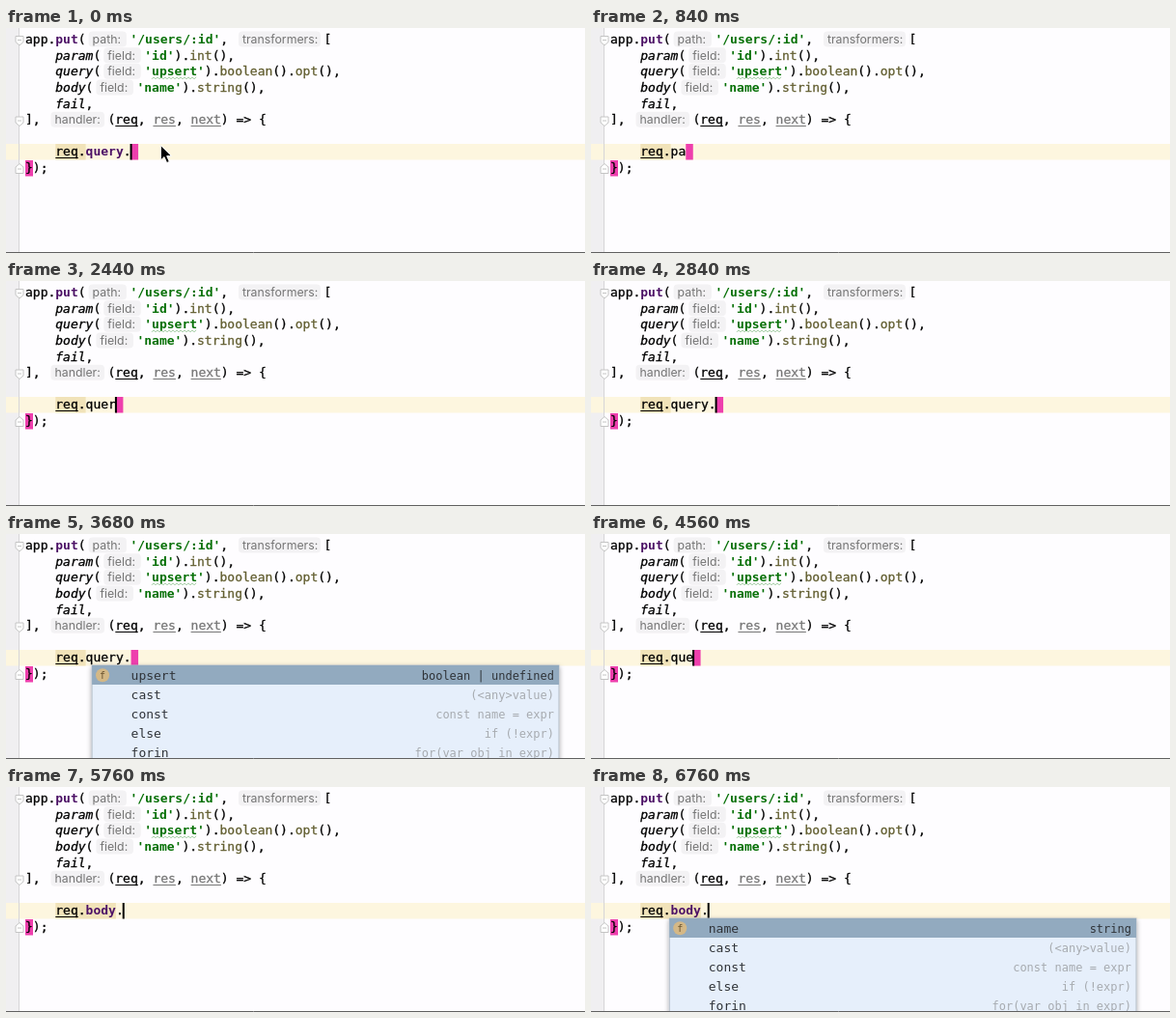
Recreate the animation shown at these times as an HTML page. Size 600 px wide and 233 px high, loop 6800 ms.

```html
<!DOCTYPE html>
<html lang="en">
<head>
<meta charset="utf-8">
<title>Typed request completion</title>
<style>
html, body { margin: 0; height: 100%; overflow: hidden; background: #fefdff; }
svg { display: block; width: 600px; height: 233px; }
text { font: 13px "DejaVu Sans Mono", monospace; white-space: pre; fill: #000; stroke: #000; stroke-width: .3px; }
.hint { font: 12.3px Inter, Roboto, sans-serif; fill: #757575; stroke: none; }
.it { font-style: italic; }
.str { font-weight: bold; fill: #067006; stroke: none; }
.prop { font-weight: bold; fill: #4c1166; stroke: none; }
.fn { fill: #625e30; stroke: #625e30; }
.dim { fill: #777; stroke: #777; }
.type { font-size: 12px; text-anchor: end; fill: #a7abb0; stroke: none; }
.sel { fill: #2f3338; stroke: none; }
.icon { font-size: 10px; text-anchor: middle; fill: #6b5430; stroke: none; }
</style>
</head>
<body>
<svg viewBox="0 0 600 233">
  <defs>
    <filter id="shadow" x="-5%" y="-10%" width="110%" height="125%">
      <feDropShadow dx="0" dy="2" stdDeviation="2.5" flood-opacity=".35"/>
    </filter>
  </defs>
  <rect width="600" height="233" fill="#fefdff"/>
  <rect width="13.5" height="233" fill="#f0eff1"/>
  <rect y="120" width="600" height="16.5" fill="#fdf6df"/>
  <path d="M13.5 0V233" stroke="#d6d5d7"/>
  <g id="code"></g>
  <g id="live"></g>
  <path d="M0 232.5H600" stroke="#606060"/>
</svg>
<script>
const LOOP = 6800, CHAR = 7.826, LEFT = 20, INDENT = LEFT + 4 * CHAR;
const PINK = '#ee3fad';
const baseline = row => 16.1 + 16.62 * row;
const esc = s => s.replace(/&/g, '&amp;').replace(/</g, '&lt;');
const text = (x, y, s, cls = '') => `<text x="${x}" y="${y}" class="${cls}">${esc(s)}</text>`;
const rect = (x, y, w, h, fill, more = '') =>
  `<rect x="${x}" y="${y}" width="${w}" height="${h}" fill="${fill}" ${more}/>`;
const underline = (x, y, chars, color) => rect(x, Math.round(y + 2), chars * CHAR, 1, color);

// Lays out [text, class] parts; a "hint" part is a pill of the given width.
function line(row, x, parts) {
  const y = baseline(row);
  let out = '';
  for (const [s, cls = '', width] of parts) {
    if (cls === 'hint') {
      out += rect(x + 3, y - 12.5, width, 16, '#f3f2f4', 'rx="4"') + text(x + 7, y - .2, s, cls);
      x += width + 6.5;
      continue;
    }
    const [style, mark] = cls.split(' ');
    out += text(x, y, s, style);
    if (mark) out += underline(x, y, s.length, style === 'dim' ? '#777' : '#000');
    x += s.length * CHAR;
  }
  return out;
}

function fold(y, up) {
  const d = up ? 'M10 150.5V144L14 140.5L18 144V150.5Z' : 'M10 8.5H18V14.5L14 18L10 14.5Z';
  const shift = up ? y - 145.5 : y - 13;
  return `<path transform="translate(0 ${shift})" d="${d}M12 ${up ? 146 : 12.5}H16" fill="#fff" stroke="#c4c4c4"/>`;
}

function wave(x, y, width) {
  let d = `M${x} ${y}`;
  for (let i = 2; i <= width; i += 2) d += `L${x + i} ${y - (i / 2 % 2) * 2}`;
  return `<path d="${d}" fill="none" stroke="#86bd86" stroke-width=".8"/>`;
}

document.getElementById('code').innerHTML =
  line(0, LEFT, [['app.'], ['put', 'prop'], ['('], ['path:', 'hint', 39.3], ["'/users/:id'", 'str'],
    [', '], ['transformers:', 'hint', 85], ['[']]) +
  line(1, INDENT, [['param', 'it'], ['('], ['field:', 'hint', 38.5], ["'id'", 'str'], [').'], ['int', 'fn'], ['(),']]) +
  line(2, INDENT, [['query', 'it'], ['('], ['field:', 'hint', 38.5], ["'upsert'", 'str'], [').'],
    ['boolean', 'fn'], ['().'], ['opt', 'fn'], ['(),']]) +
  wave(151, baseline(2) + 3.5, 46) +
  line(3, INDENT, [['body', 'it'], ['('], ['field:', 'hint', 38.5], ["'name'", 'str'], [').'], ['string', 'fn'], ['(),']]) +
  line(4, INDENT, [['fail', 'it'], [',']]) +
  line(5, LEFT, [['], '], ['handler:', 'hint', 55.5], ['('], ['req', 'plain u'], [', '], ['res', 'dim u'],
    [', '], ['next', 'dim u'], [') => {']]) +
  rect(LEFT, 137, 8, 16.5, PINK) + line(8, LEFT, [['});']]) +
  fold(13) + fold(96.5) + fold(145.5, true);

// Keystrokes as [time, text after "req."].
const keys = [[-400, 'query.']];
const last = () => keys[keys.length - 1][1];
function type(start, step, s) {
  [...s].forEach((c, i) => keys.push([start + i * step, last() + c]));
}
function erase(start, step) {
  for (let t = start; last(); t += step) keys.push([t, last().slice(0, -1)]);
}
erase(160, 60);
type(760, 80, 'params.');
erase(1880, 40);
type(2200, 80, 'query');
type(2760, 80, '.');
erase(4400, 60);
type(5080, 140, 'body.');

const templates = [['cast', '(<any>value)'], ['const', 'const name = expr'],
  ['else', 'if (!expr)'], ['forin', 'for(var obj in expr)']];
const members = [['body', '{ name: string }'], ['baseUrl', 'string'], ['subdomains', 'string[]'],
  ['params', '{ id: number }'], ['query', '{ upsert: boolean | undefined }']];
// [from, to, typed characters before the list's anchor, right edge, rows]
const popups = [
  [520, 740, 0, 591, members],
  [1360, 1880, 7, 581, [['id', 'number'], ...templates]],
  [2880, 4400, 6, 573, [['upsert', 'boolean | undefined'], ...templates]],
  [4800, 5040, 0, 591, members],
  [5280, 5500, 0, 544, members.slice(0, 3)],
  [5840, LOOP, 5, 565, [['name', 'string'], ...templates]],
];

function popup([, , typed, right, rows]) {
  const x = INDENT + (4 + typed) * CHAR - 40.5, w = right - x;
  return rect(x, 136, w, rows.length * 20 + 3, '#e6effb', 'stroke="#b4bcc6" filter="url(#shadow)"') +
    rect(x, 136, w, 20, '#92aabf') +
    `<circle cx="${x + 11}" cy="146.3" r="7" fill="#d4b886"/>` + text(x + 11, 149.8, 'f', 'icon') +
    rows.map(([name, kind], i) => {
      const y = 151 + 20 * i;
      return text(x + 40.5, y, name, 'sel') + text(right - 5, y - .3, kind, i ? 'type' : 'type sel');
    }).join('');
}

const pointer = '<path d="M160.3 121.5V137L164 133.6L166.6 139.6L169.3 138.4L166.7 132.6H171.6Z" fill="#000" stroke="#fff"/>';
const live = document.getElementById('live');

function draw(t) {
  const [since, typed] = keys.findLast(k => k[0] <= t);
  const inBody = t >= 5640;
  const resolved = inBody || t < 220;
  const end = INDENT + (4 + typed.length) * CHAR;
  const caretOn = Math.floor((t - since) / 500) % 2 === 0 && !(t >= 840 && t < 880);
  const name = typed.replace('.', ''), dot = typed.slice(name.length);

  let out = rect(INDENT, 120, (inBody ? 8 : 4) * CHAR, 16.5, '#f1e3b9');
  if (!inBody) out += rect(end, 120, 7.5, 16.5, PINK);
  out += line(7, INDENT, [['req', 'plain u'], ['.'], [name, resolved ? 'prop' : ''], [dot]]);
  if (caretOn) out += rect(end - 1, 120, 2, 16.5, '#000');
  const open = popups.find(p => t >= p[0] && t < p[1]);
  if (open) out += popup(open);
  if (t < 160) out += pointer;
  live.innerHTML = out;
}

const start = performance.now();
function tick() {
  draw((performance.now() - start) % LOOP);
  requestAnimationFrame(tick);
}
tick();
</script>
</body>
</html>
```
